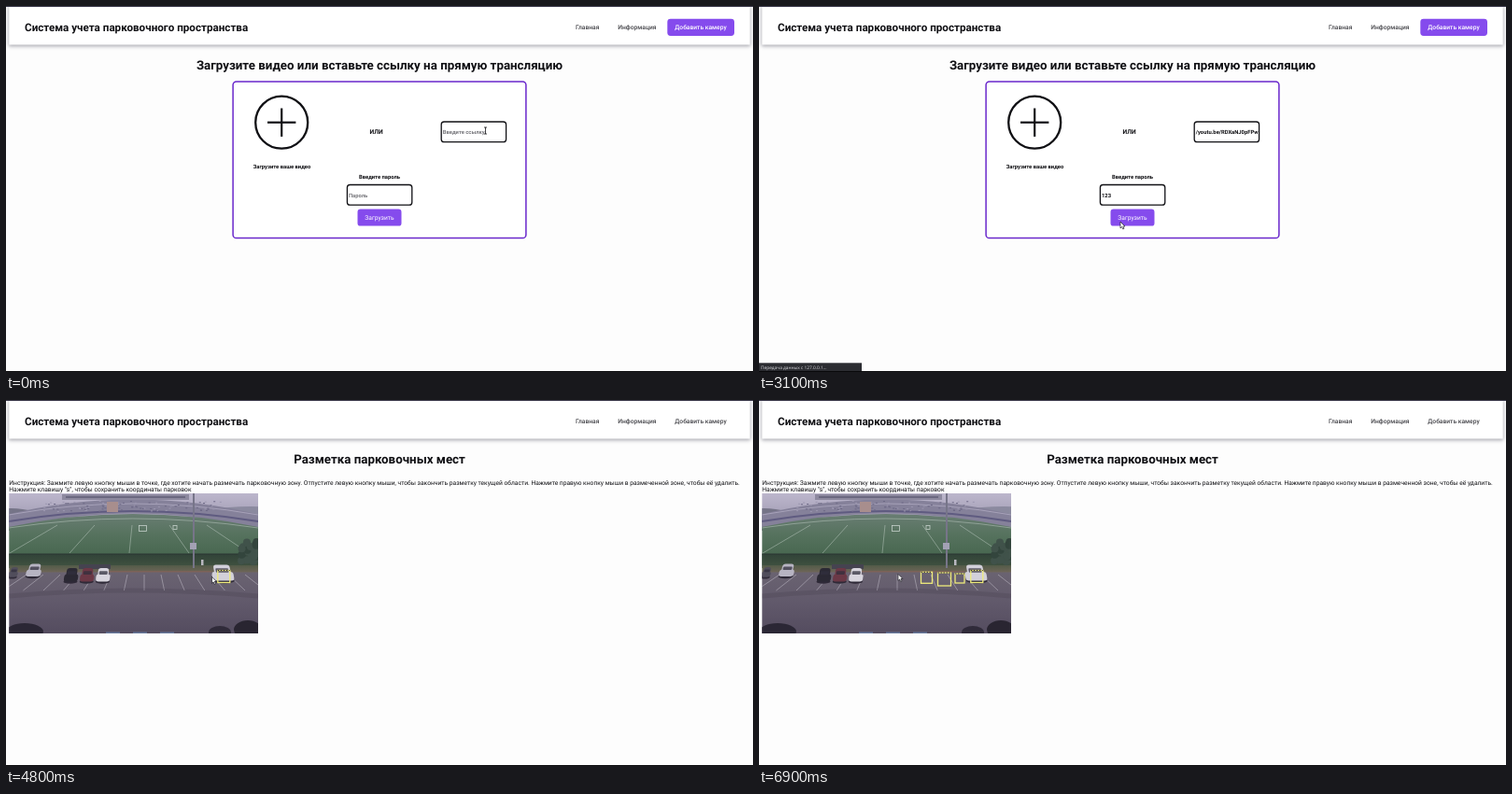
Write an HTML page with a canvas that moves like this. It is 800 by 392 pixels and loops after 7000 ms.

```html
<!DOCTYPE html>
<html lang="ru">
<head>
<meta charset="utf-8">
<style>
  html, body { margin: 0; width: 100%; height: 100%; overflow: hidden; background: #fdfdfd; }
  canvas { display: block; width: 800px; height: 392px; }
</style>
</head>
<body>
<canvas id="stage" width="800" height="392"></canvas>
<script>
const stage = document.getElementById('stage').getContext('2d');
let ctx = stage;
const LOOP = 7000, STEP = 100, PAGE_SWITCH = 3200;
const PURPLE = '#854bed', INK = '#101014', GREY = '#45454a';
const SMALL = 5.83, BODY = 6.68, TITLE = 11.67, HEADING = 13.333;

// Drawing helpers
function text(str, x, y, size, { weight = 400, color = INK, align = 'left', family = 'Roboto' } = {}) {
  ctx.font = `${weight} ${size}px ${family}, sans-serif`;
  ctx.fillStyle = color;
  ctx.textAlign = align;
  ctx.fillText(str, x, y);
}

function rect(x, y, w, h, color) {
  ctx.fillStyle = color;
  ctx.fillRect(x, y, w, h);
}

function rounded(x, y, w, h, r, fill, stroke, width) {
  ctx.beginPath();
  ctx.roundRect(x, y, w, h, r);
  ctx.fillStyle = fill;
  ctx.fill();
  if (stroke) { ctx.strokeStyle = stroke; ctx.lineWidth = width; ctx.stroke(); }
}

function line(x0, y0, x1, y1, color, width) {
  ctx.beginPath();
  ctx.moveTo(x0, y0);
  ctx.lineTo(x1, y1);
  ctx.strokeStyle = color;
  ctx.lineWidth = width;
  ctx.stroke();
}

function blob(x, y, rx, ry, color) {
  ctx.beginPath();
  ctx.ellipse(x, y, rx, ry, 0, 0, Math.PI * 2);
  ctx.fillStyle = color;
  ctx.fill();
}

function shade(y0, y1, ...colors) {
  const g = ctx.createLinearGradient(0, y0, 0, y1);
  colors.forEach((c, i) => g.addColorStop(i / (colors.length - 1), c));
  return g;
}

// Seeded generator, so that the texture is the same on every load
function seeded(seed) {
  return () => (seed = (seed * 16807) % 2147483647) / 2147483647;
}

// Shared page frame
function header(active) {
  rect(0, 0, 800, 392, '#fdfdfd');
  ctx.save();
  ctx.shadowColor = 'rgba(20,20,40,.38)';
  ctx.shadowBlur = 4;
  ctx.shadowOffsetY = 1;
  rect(3.3, 0, 793.4, 41.5, '#fff');
  ctx.restore();
  rect(0, 0, 800, 1, '#3c3a4c');
  rect(0, 391, 800, 1, '#08080a');
  text('Система учета парковочного пространства', 20, 27.3, TITLE, { weight: 700 });
  if (active) rounded(708.3, 13.7, 71.7, 18.2, 3.4, PURPLE);
  const nav = (str, x, color = GREY) => text(str, x, 25.2, BODY, { weight: 500, color });
  nav('Главная', 610);
  nav('Информация', 655.3);
  nav('Добавить камеру', 716.3, active ? '#fff' : GREY);
}

function heading(str) {
  text(str, 400, 67.6, HEADING, { weight: 700, align: 'center' });
}

function field(x, y, value, placeholder) {
  rounded(x, y, 69.4, 21.7, 3, '#fff', INK, 1.3);
  text(value || placeholder, x + 1.6, y + 13, SMALL, { weight: 700, color: value ? INK : '#77777c' });
}

function plusIcon(x, y) {
  ctx.beginPath();
  ctx.arc(x, y, 28, 0, Math.PI * 2);
  ctx.strokeStyle = INK;
  ctx.lineWidth = 2.3;
  ctx.stroke();
  line(x - 15.2, y, x + 15.2, y, INK, 2.2);
  line(x, y - 15.2, x, y + 15.2, INK, 2.2);
}

function uploadPage(t) {
  header(true);
  heading('Загрузите видео или вставьте ссылку на прямую трансляцию');
  rounded(243.1, 80.9, 313.8, 167.6, 3.6, '#fff', '#6a28cc', 1.5);
  plusIcon(295.2, 124.7);

  const bold = { weight: 700, align: 'center' };
  text('Загрузите ваше видео', 295.5, 173.8, SMALL, bold);
  text('ИЛИ', 396.5, 136.7, BODY, bold);
  text('Введите пароль', 400, 185.2, SMALL, bold);

  const typed = Math.max(0, Math.floor((t - 1000) / 200));
  field(466.2, 124, t >= 700 ? '/youtu.be/RDXaNJ0pFPw' : '', 'Введите ссылку');
  field(365.4, 191.5, '123'.slice(0, typed), 'Пароль');

  rounded(376.5, 217.6, 47, 18, 3.2, PURPLE);
  text('Загрузить', 400, 229, BODY, { color: '#fff', align: 'center' });

  if (t >= 2900) {
    rect(0, 382.3, 110, 8.7, '#2b2c31');
    text('Передача данных с 127.0.0.1...', 2, 388.6, 4.8, { color: '#dddde2', family: 'Open Sans' });
  }
}

// Simplified camera view: stadium, field and car park
function arcBand(edge, middle, color, width) {
  ctx.beginPath();
  ctx.moveTo(3, edge);
  ctx.quadraticCurveTo(135, 2 * middle - edge, 270, edge);
  ctx.strokeStyle = color;
  ctx.lineWidth = width;
  ctx.stroke();
}

function stadium(random) {
  rect(3, 100, 267, 40, shade(100, 130, '#bcb6cc', '#a09bb2'));
  blob(262, 128, 60, 14, '#8b8a9f');
  blob(5, 128, 34, 12, '#757487');
  arcBand(130, 114, '#85819a', 15);
  arcBand(123, 111, '#a7a2b9', 1);
  arcBand(130, 119, '#5f5b80', 2);
  rect(60, 101, 136, 6, '#8d899f');
  rect(64, 103, 128, 2, '#6b6880');
  for (let i = 0; i < 90; i++) {
    rect(40 + random() * 190, 108 + random() * 11, 2, 1, random() < 0.5 ? '#9c97b0' : '#6c6885');
  }
  rect(108, 109, 12, 11, '#a88e8d');
}

function pitch() {
  ctx.beginPath();
  ctx.moveTo(3, 136);
  ctx.quadraticCurveTo(135, 108, 270, 136);
  ctx.lineTo(270, 180);
  ctx.lineTo(3, 180);
  ctx.fillStyle = shade(120, 168, '#6b7e75', '#56725e', '#47664f');
  ctx.fill();
  const chalk = 'rgba(205,216,210,.55)';
  arcBand(137, 127, chalk, 0.8);
  for (let x = 55; x <= 215; x += 40) line(x, 134, x + (x - 140) * 0.6, 164, chalk, 0.8);
  ctx.strokeStyle = '#c5d0ca';
  ctx.strokeRect(142.5, 134.5, 8, 6);
  ctx.strokeRect(179, 134.5, 4, 4);
}

function fence() {
  rect(3, 165, 267, 12, shade(165, 177, '#314338', '#3e503f'));
  line(3, 165, 270, 165, '#2b3532', 1);
  rect(3, 177, 267, 8, shade(177, 185, '#525b48', '#706659'));
  line(105, 184, 220, 184, '#8f6058', 1);
}

function carPark() {
  rect(3, 184.5, 267, 66, shade(184, 250, '#6a6371', '#61596b', '#544c5f'));
  for (let x = 22; x < 262; x += 18) line(x, 187, x + (x - 148) * 0.2, 204, 'rgba(205,200,210,.6)', 0.8);
  arcBand(210, 204, 'rgba(42,36,55,.14)', 5);
}

function car(x, y, w, h, body) {
  ctx.save();
  ctx.translate(x, y);
  ctx.transform(1, 0, (x - 148) * 0.002, 1, 0, 0);
  blob(0, h * 0.4, w * 0.5, h * 0.15, '#2f2a38');
  rounded(-w / 2, -h * 0.1, w, h * 0.5, 3, body);
  rounded(-w * 0.38, -h * 0.5, w * 0.76, h * 0.6, 3, body);
  rounded(-w * 0.3, -h * 0.3, w * 0.6, h * 0.24, 1, 'rgba(50,47,62,.75)');
  ctx.restore();
}

function drawPhoto() {
  const random = seeded(7);
  ctx.save();
  ctx.beginPath();
  ctx.rect(3.3, 100, 266.7, 150);
  ctx.clip();
  ctx.filter = 'blur(0.5px)';
  stadium(random);
  pitch();
  fence();
  carPark();

  for (let i = 0; i < 24; i++) {
    blob(250 + random() * 20, 152 + random() * 22, 4, 4, random() < 0.5 ? '#33453d' : '#40524a');
  }
  rect(200, 100, 2, 80, '#777589');
  rect(197, 153, 7, 7, '#a3a1b4');
  rect(209, 171, 2.5, 6, '#b9b8c0');

  rect(78, 176, 34, 5, '#454350');
  ['#2b2934', '#6b3846', '#d8d5de'].forEach((color, i) => car(70 + i * 17, 188, 15, 16, color));
  car(30, 183, 16, 15, '#b7b4c2');
  car(8, 185, 10, 12, '#514e5c');
  car(232, 186, 23, 19, '#d2d0da');

  blob(20, 248, 20, 9, '#2b2735');
  blob(229, 249, 12, 7, '#302b3a');
  blob(259, 246, 15, 10, '#292531');
  for (let x = 107; x < 180; x += 29) rect(x, 248.5, 15, 2, '#64769a');
  ctx.restore();
}

const photo = document.createElement('canvas');
photo.width = 800;
photo.height = 392;
ctx = photo.getContext('2d');
drawPhoto();
ctx = stage;

// Marked bays are square; each is dragged from its top left corner
const bay = (x, y, size, start, end) => ({ x, y, size, start, end });
const bays = [
  bay(226.8, 182.5, 13, 4100, 4500),
  bay(210, 186, 10, 5000, 5700),
  bay(191.5, 185, 14, 6200, 6300),
  bay(173.5, 184.3, 12, 6500, 6700),
];

// Pointer path: time, x, y
const path = [
  [0, 513.5, 133.5], [600, 513.5, 133.5], [1000, 470, 150], [2000, 470, 150],
  [2700, 387, 231], [3200, 387, 231], [3700, bays[0].x, bays[0].y],
  ...bays.flatMap(({ x, y, size, start, end }) => [[start, x, y], [end, x + size, y + size]]),
  [6900, 149, 186.5], [LOOP, 149, 186.5],
];

const clamp = v => Math.max(0, Math.min(1, v));
const ease = v => v * v * (3 - 2 * v);

function pointer(t) {
  const i = path.findIndex(p => p[0] > t);
  const [t0, x0, y0] = path[i - 1], [t1, x1, y1] = path[i];
  const k = ease((t - t0) / (t1 - t0));
  return [x0 + (x1 - x0) * k, y0 + (y1 - y0) * k];
}

function drawBay({ x, y, size, start, end }, t) {
  if (t <= start) return;
  const side = size * ease(clamp((t - start) / (end - start)));
  ctx.lineWidth = 1.3;
  ctx.strokeStyle = '#efec7c';
  ctx.strokeRect(x, y, side, side);
  ctx.setLineDash([1.5, 1.5]);
  line(x, y, x + side, y, '#34322f', 1);
  ctx.setLineDash([]);
}

function markupPage(t) {
  header(false);
  heading('Разметка парковочных мест');
  text('Инструкция: Зажмите левую кнопку мыши в точке, где хотите начать размечать парковочную зону. Отпустите левую кнопку мыши, чтобы закончить разметку текущей области. Нажмите правую кнопку мыши в размеченной зоне, чтобы её удалить.', 3.3, 90.6, BODY);
  text('Нажмите клавишу "s", чтобы сохранить координаты парковок', 3.3, 98.4, BODY);
  ctx.drawImage(photo, 0, 0);
  bays.forEach(b => drawBay(b, t));
}

function textCursor(x, y) {
  line(x, y - 3.5, x, y + 3.5, INK, 0.8);
  for (const end of [y - 3.5, y + 3.5]) line(x - 1.5, end, x + 1.5, end, INK, 0.8);
}

function arrow(x, y) {
  const outline = new Path2D(`M${x} ${y}v7l1.6-1.5 1.2 2.5 1.2-.6-1.1-2.4h2.1z`);
  ctx.fillStyle = '#fff';
  ctx.fill(outline);
  ctx.strokeStyle = '#202028';
  ctx.lineWidth = 0.7;
  ctx.stroke(outline);
}

function drawPointer(t) {
  const [x, y] = pointer(t);
  if (t < 700) textCursor(x, y);
  else if (t >= 1700 && t <= 2000) rounded(x - 1, y + 1, 9, 7, 3, '#d4d4d7');
  else arrow(x, y);
}

function frame(now) {
  const t = Math.floor((now % LOOP) / STEP) * STEP;
  ctx.textRendering = 'geometricPrecision';
  if (t < PAGE_SWITCH) uploadPage(t);
  else markupPage(t);
  drawPointer(t);
  requestAnimationFrame(frame);
}

frame(0);
</script>
</body>
</html>
```
